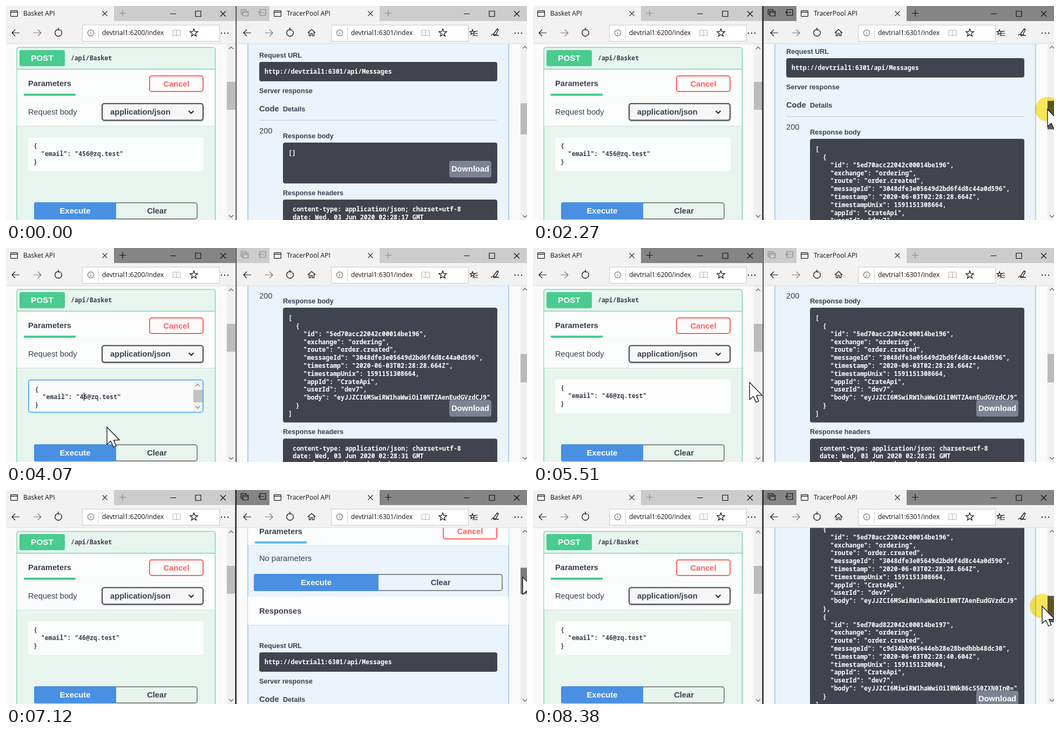
An HTML page for the animation above (8.61 s loop, 965 by 398 pixels).

```html
<!DOCTYPE html>
<html lang="en">
<head>
<meta charset="utf-8">
<title>API demo</title>
<style>
html, body { margin: 0; width: 100%; height: 100%; overflow: hidden; background: #fafafa; }
svg { display: block; }
text { font-family: "Liberation Sans", Arial, sans-serif; fill: #3b4151; white-space: pre; }
.b { font-weight: bold; }
.m { font-family: "Noto Sans Mono", "DejaVu Sans Mono", monospace; font-weight: bold; }
.u { font-family: "Open Sans", "Noto Sans", sans-serif; fill: #111; }
.mid { text-anchor: middle; }
.line { fill: none; stroke: #111; stroke-width: 1.2; }
</style>
</head>
<body>
<svg id="stage" width="965" height="398" viewBox="0 0 965 398"></svg>
<script>
const LOOP = 8610, CODE = 11.55, ROW = 14.8;
const DARK = '#41444e', GREEN = '#49cc90', BLUE = '#61affe';

// ---- drawing helpers (text is placed by its vertical centre) ----
const text = (x, cy, s, size = 14.7, cls = '', fill = '') =>
  `<text x="${x}" y="${cy + size * .36}" font-size="${size}" class="${cls}"${fill && ` style="fill:${fill}"`}>${s}</text>`;
const rect = (x, y, w, h, fill, r = 0, extra = '') =>
  `<rect x="${x}" y="${y}" width="${w}" height="${h}" rx="${r}" fill="${fill}" ${extra}/>`;
const line = (d, color = '#111', width = 1.2) =>
  `<path class="line" d="${d}" style="stroke:${color};stroke-width:${width}"/>`;
const frame = (x, y, w, h, color, width = 2, fill = 'none', r = 4) =>
  rect(x + width / 2, y + width / 2, w - width, h - width, fill, r, `stroke="${color}" stroke-width="${width}"`);
const code = (x, cy, rows, fill) =>
  rows.map((s, i) => text(x, cy + i * ROW, s, CODE, 'm', fill)).join('');
const chevron = (x, y, up, color = '#666') =>
  line(`M${x - 4} ${y + (up ? 2 : -2)}l4 ${up ? -4 : 4}l4 ${up ? 4 : -4}`, color, 1.3);

function star(x, y, r) {
  let d = '';
  for (let i = 0; i < 10; i++) {
    const a = i * Math.PI / 5 - Math.PI / 2, q = i % 2 ? r * .42 : r;
    d += `${i ? 'L' : 'M'}${x + q * Math.cos(a)} ${y + q * Math.sin(a)}`;
  }
  return line(d + 'Z');
}

// ---- browser frame ----
function browser(w) {
  const { id, left, right, tab, tabEnd, url, box } = w;
  const plus = tabEnd + 16, cross = tabEnd - 17, ctl = w.controls;
  return rect(left, 0, right - left, 28, '#ccc', 0, `id="${id}Bar"`) +
    rect(tab, 0, tabEnd - tab, 29, '#f2f2f2') +
    rect(left, 28, right - left, 42, '#f2f2f2') + rect(left, 69.5, right - left, 1, '#ddd') +
    frame(tab + 8, 8, 14, 12, '#222', 1.2, 'none', 1) + line(`M${tab + 8} 11.5h14`) +
    text(tab + 32, 13.5, w.title, 12, 'u') +
    line(`M${cross - 4.5} 9.5l9 9m0-9l-9 9`, '#333') +
    `<g id="${id}Icons">` + line(`M${plus - 6} 13.5h12m-6-6v12`, 'inherit') + (w.icons || '') + '</g>' +
    line(`M${ctl} 14.5h11M${ctl + 47} 9.5h10v10h-10zM${ctl + 93} 9.5l10 10m0-10l-10 10`) +
    line(`M${w.nav + 7} 50h-14m6-6l-6 6l6 6`) +
    line(`M${w.nav + 33} 50h14m-6-6l6 6l-6 6`, '#777') +
    line(`M${w.nav + 84} 46a6.3 6.3 0 1 1-5-2.4m0-3v4h4.5`, '#111', 1.4) +
    frame(box, 35, 255, 31, '#c8c8c8', 1, '#fff', 0) +
    `<circle class="line" cx="${box + 16}" cy="50" r="5.6" style="stroke:#777"/>` +
    line(`M${box + 16} 49v4m0-6.5v1.2`, '#777') + rect(box + 30, 39, 1, 23, '#ccc') +
    text(box + 37, 50, url, 12, 'u') +
    line(`M${box + 175} 45.5q-3-2-7 0v10q4-2 7 0q3-2 7 0v-10q-4-2-7 0v10`, '#bbb') +
    star(box + 207, 50, 7.5) +
    [0, 6, 12].map(d => rect(w.dots + d, 49.5, 2, 2, '#111')).join('');
}

const leftBrowser = browser({
  id: 'left', left: 0, right: 425, tab: 0, tabEnd: 200, title: 'Basket API',
  url: 'devtrial1:6200/index', box: 141, nav: 18, controls: 304, dots: 398
});
const rightBrowser = browser({
  id: 'right', left: 427, right: 965, tab: 488, tabEnd: 692, title: 'TracerPool API',
  url: 'devtrial1:6301/index', box: 602, nav: 447, controls: 848, dots: 942,
  icons: line('M438 15.5h-2.5v-9h9v2.5M438.5 9.5h10v9h-10zM438.5 12h10', 'inherit') +
    line('M470 8v-1.5h11v11h-11v-1.5M478 12h-10m3.5-3.5l-3.5 3.5l3.5 3.5', 'inherit')
}) +
  line('M559 50l7-6.5l7 6.5M561.5 48.5v7h3v-4.5h3v4.5h3v-7') +
  star(864, 49, 5) + line('M868 47h6m-6 4h6m-10 4h10') +
  line('M899 55q1.5-4 5-2t4-1l4-8l-2-1.5l-6 8q-2 6 1 4.5t8 0', '#111', 1.3);

// ---- shared page parts ----
const cancel = (x, y) => frame(x, y, 101, 31, '#ff6060') + text(x + 50.5, y + 15.5, 'Cancel', 14.7, 'b mid', '#ff6060');
const actions = (x, y, a, b) =>
  frame(x + a - 3, y, b + 3, 32, '#888') + rect(x, y, a, 32, '#4990e2', 3) + rect(x + a - 4, y, 4, 32, '#4990e2') +
  text(x + a / 2, y + 16, 'Execute', 14.9, 'b mid', '#fff') + text(x + a + b / 2, y + 16, 'Clear', 14.7, 'b mid');
const summary = (x, y, verb, path, color) =>
  rect(x, y, 84, 30, color, 3) + text(x + 42, y + 15, verb, 15.2, 'b mid', '#fff') + text(x + 95, y + 15, path, CODE, 'm');

const leftPage =
  rect(0, 70, 425, 328, '#fafafa') +
  frame(19.5, 76.5, 368.5, 360, GREEN, 1, '#e8f4ee') +
  summary(25, 82, 'POST', '/api/Basket', GREEN) +
  rect(20, 117, 367, 1, GREEN) + rect(20.5, 118, 366.5, 105, '#fbfdfc') +
  rect(20.5, 170, 366.5, 1, '#f3f7f5') + rect(20.5, 223, 366.5, 1, '#cfdad5') +
  text(41, 144, 'Parameters', 14.7, 'b') + rect(33, 163, 96, 4, GREEN) + cancel(265, 129) +
  text(41, 197, 'Request body') +
  rect(178, 183, 188, 32, 'rgba(0,0,0,.2)', 4) + frame(177, 180.5, 189, 33, DARK, 2, '#f7f7f7') +
  text(193, 197, 'application/json', 14.7, 'b') + line('M338.5 195l4.5 4.5l4.5-4.5', '#222', 2) +
  '<g id="editor"></g>' + actions(52, 365, 152, 151) +
  rect(409, 70, 16, 328, '#f0f0f0') + rect(409, 141, 16, 52, '#bcbcbc') +
  chevron(417, 78, true) + chevron(417, 391);

const rightPage =
  frame(447.5, 30, 484, 1200, BLUE, 1, '#ebf3fb') +
  summary(453, 57, 'GET', '/api/Messages', BLUE) +
  rect(448, 92, 483, 1, BLUE) + rect(448, 93, 483, 53, '#fbfdfe') + rect(448, 146, 483, 1, '#dde4ea') +
  text(469, 120, 'Parameters', 14.7, 'b') + rect(461, 138.5, 96, 4, BLUE) + cancel(809, 104) +
  text(469, 170, 'No parameters') + actions(459, 199, 231, 230) +
  rect(448, 241, 483, 53, '#fbfdfe') + rect(448, 294, 483, 1, '#ccd5dc') +
  text(469, 268, 'Responses', 14.7, 'b') +
  text(469, 332, 'Request URL', 12.6, 'b') + rect(469, 345, 441, 36, DARK, 4) +
  text(479, 363, 'http://devtrial1:6301/api/Messages', CODE, 'm', '#fff') +
  text(469, 398, 'Server response', 12.6, 'b') +
  text(469, 432, 'Code', 14.7, 'b') + text(513, 432, 'Details', 12.6, 'b') +
  rect(469, 453, 441, 1, '#c5cbd2') + text(469, 473, '200') +
  text(513, 482, 'Response body', 12.6, 'b') + '<g id="response"></g>';

// ---- response contents ----
const entry = (id, messageId, stamp, unix, body) => [
  '  {', `    "id": "${id}",`, '    "exchange": "ordering",', '    "route": "order.created",',
  `    "messageId": "${messageId}",`, `    "timestamp": "${stamp}",`, `    "timestampUnix": ${unix},`,
  '    "appId": "CrateApi",', '    "userId": "dev7",', `    "body": "${body}"`
];
const first = entry('5ed70acc22042c00014be196', '3048dfe3e05649d2bd6f4d8c44a0d596',
  '2020-06-03T02:28:28.664Z', 1591151308664, 'eyJJZCI6MSwiRW1haWwiOiI0NTZAenEudGVzdCJ9');
const second = entry('5ed70ad822042c00014be197', 'c9d34bb965e44eb28e28bedbbb48dc30',
  '2020-06-03T02:28:40.604Z', 1591151320604, 'eyJJZCI6MiwiRW1haWwiOiI0NkB6cS50ZXN0In0=');
const results = [
  { rows: ['[]'], sec: 17, thumb: 58, ratio: .174 },
  { rows: ['[', ...first, '  }', ']'], sec: 31, thumb: 53, ratio: .151 },
  { rows: ['[', ...first, '  },', ...second, '  }', ']'], sec: 43, thumb: 49, ratio: .127 }
];
function response({ rows, sec }) {
  const h = Math.max(76, rows.length * ROW + 21), end = 495 + h;
  return rect(513, 495, 397, h, DARK, 4) + code(523, 514, rows, '#fff') +
    rect(821, end - 42, 78, 31, '#7d8293', 4) + text(860, end - 27, 'Download', 14.7, 'b mid', '#fff') +
    text(513, end + 17, 'Response headers', 12.6, 'b') + rect(513, end + 30, 397, 90, DARK, 4) +
    code(531, end + 48, ['content-type: application/json; charset=utf-8',
      `date: Wed, 03 Jun 2020 02:28:${sec} GMT`, 'transfer-encoding: chunked'], '#fff');
}

const json = mail => ['{', `  "email": "${mail}"`, '}'];
function editor(mail, focused) {
  if (!focused) return rect(41, 244, 325, 63, '#fafdfb', 4) + code(51, 260, json(mail));
  return frame(41, 244.5, 325, 62, BLUE, 2, '#fbfbfb') + code(53.5, 262.5, json(mail)) +
    rect(347, 246.5, 17, 58, '#f0f0f0') + rect(347, 264, 17, 23, '#c1c1c1') +
    chevron(355, 255, true, '#888') + chevron(355, 296, false, '#888') + rect(144, 269, 1, 15, '#000');
}

document.getElementById('stage').innerHTML =
  '<clipPath id="view"><rect x="427" y="70" width="526" height="328"/></clipPath>' +
  leftPage + leftBrowser +
  rect(427, 70, 538, 328, '#fafafa') +
  `<g clip-path="url(#view)"><g id="scroll">${rightPage}</g></g>` +
  rect(953, 70, 12, 328, '#f0f0f0') + rect(953, 139, 12, 58, '#bababa', 0, 'id="thumb"') +
  chevron(961, 77, true) + chevron(961, 391) + rightBrowser +
  rect(425, 0, 2, 398, '#222', 0, 'id="edge"') +
  '<circle id="press" r="23" fill="#fdea5c" style="mix-blend-mode:multiply"/>' +
  '<g id="cursor"><path id="arrow" d="M0 0V32L7 26L12 37L17 35L12.5 24.5L23 24Z" fill="#fff" stroke="#111" stroke-width="1.3"/>' +
  '<path id="beam" class="line" d="M-4-10h8m-4 0v20m-4 0h8"/></g>';

// ---- timeline: each move is start, end, then where it arrives ----
const moves = [
  [150, 150, 120, 384], [360, 650, 955, 215], [720, 1010, 953, 173], [1300, 1480, 574, 216],
  [1640, 1860, 953, 157], [1920, 2120, 953, 184], [2210, 2270, 953, 192], [2370, 2590, 953, 213],
  [2830, 3540, 145, 274], [4070, 4070, 187, 333], [4140, 4400, 150, 382], [4600, 4900, 398, 250],
  [5510, 5690, 962, 219], [5720, 5950, 962, 166], [6330, 6600, 570, 174], [6790, 7120, 957, 162],
  [7190, 7670, 957, 190], [7720, 8050, 946, 211], [8120, 8380, 943, 216]
];
const scrolls = [
  [720, 1010, 0], [1920, 2120, 190], [2210, 2270, 248], [2370, 2590, 384],
  [5720, 5950, 43], [7190, 7670, 279], [7720, 8050, 420], [8120, 8380, 456]
];
const presses = [
  [220, 360], [700, 1300], [1520, 1640], [1920, 2830], [3620, 3850],
  [4480, 4600], [5720, 5900], [6680, 6790], [7190, LOOP]
];
function follow(track, from, t) {
  let pos = from;
  for (const [start, end, ...to] of track) {
    if (t < start) break;
    const k = t >= end ? 1 : (t - start) / (end - start);
    pos = pos.map((v, i) => v + (to[i] - v) * k);
  }
  return pos;
}

const $ = id => document.getElementById(id);
const set = (id, attrs) => { for (const k in attrs) $(id).setAttribute(k, attrs[k]); };
const shown = {};
function fill(id, key, make) {
  if (shown[id] !== key) { shown[id] = key; $(id).innerHTML = make(); }
}

function draw(now) {
  const t = now % LOOP;
  const leftOn = t >= 220 && t < 700 || t >= 3700 && t < 5720;
  const rightOn = !leftOn && t >= 700;
  for (const [id, on] of [['left', leftOn], ['right', rightOn]]) {
    set(id + 'Bar', { fill: on ? '#858585' : '#ccc' });
    $(id + 'Icons').style.stroke = on ? '#111' : '#888';
  }
  set('edge', { x: rightOn ? 424.5 : 425.5, width: rightOn ? 2.5 : 1.5 });

  const v = t < 1640 ? 0 : t < 6790 ? 1 : 2, r = results[v];
  fill('response', v, () => response(r));
  const mail = t < 3850 ? '456@zq.test' : '46@zq.test', focused = t >= 3700 && t < 4480;
  fill('editor', mail + focused, () => editor(mail, focused));

  const [offset] = follow(scrolls, [241], t);
  set('scroll', { transform: `translate(0 ${-Math.round(offset)})` });
  const [x, y] = follow(moves, [-60, 384], t);
  const held = presses.some(([start, end]) => t >= start && t < end);
  const thumbFill = x > 930 && held ? '#5f5b5f' : x > 950 ? '#7c7c7c' : '#bababa';
  set('thumb', { y: 139 + offset * r.ratio, height: r.thumb, fill: thumbFill });

  set('cursor', { transform: `translate(${x} ${y})` });
  set('press', { cx: x, cy: y, visibility: held ? 'visible' : 'hidden' });
  const beam = t >= 3540 && t < 4070;
  set('arrow', { visibility: beam ? 'hidden' : 'visible' });
  set('beam', { visibility: beam ? 'visible' : 'hidden' });
}

const start = performance.now();
(function tick() {
  draw(performance.now() - start);
  requestAnimationFrame(tick);
})();
</script>
</body>
</html>
```
